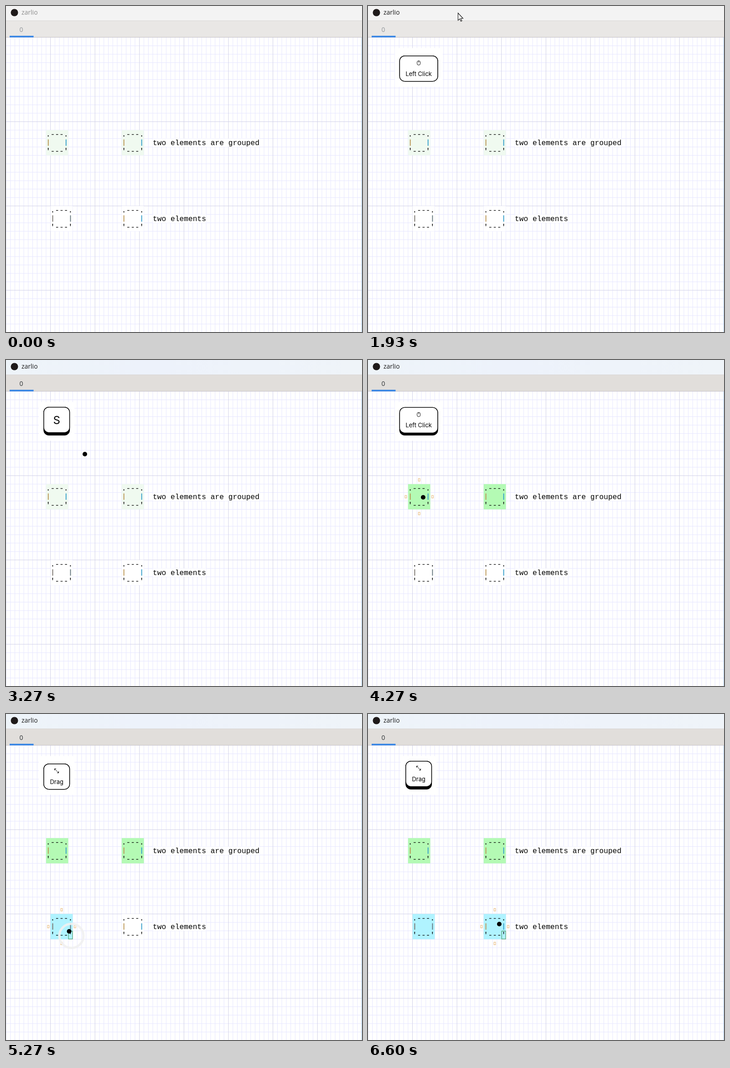
Write an HTML page that moves like this. It is 781 px wide and 717 px high and loops after 8000 ms.

```html
<!DOCTYPE html>
<html lang="en">
<head>
<meta charset="utf-8">
<title>Grouped elements</title>
<style>
  html, body { margin: 0; width: 100%; height: 100%; overflow: hidden; background: #fff; }
  svg { display: block; width: 781px; height: 717px; }
  text { white-space: pre; }
  .ui { font: 14px "Open Sans", "Noto Sans", sans-serif; }
  .mono { font: 16.26px "Liberation Mono", "Courier New", monospace; }
  .cap { font: 13px Inter, Roboto, sans-serif; text-anchor: middle; }
  .big { font-size: 24px; }
</style>
</head>
<body>
<svg id="stage" viewBox="0 0 781 717">
  <defs>
    <linearGradient id="focus">
      <stop offset="0" stop-color="#eef4f9"/>
      <stop offset=".4" stop-color="#edf2fb"/>
      <stop offset="1" stop-color="#eff4f9"/>
    </linearGradient>
  </defs>
  <g id="grid"></g>
  <rect id="titleBar" width="781" height="32"/>
  <rect y="32" width="781" height="1" fill="#d9d7d5"/>
  <rect id="tabBar" y="33" width="781" height="36"/>
  <rect y="68" width="781" height="1" fill="#d0cbc6"/>
  <rect x="8" y="65.5" width="52.5" height="3.5" fill="#3584e4"/>
  <circle cx="18.5" cy="14.5" r="8" fill="#1f1a1a"/>
  <text id="title" class="ui" x="34" y="19">zarlio</text>
  <text id="tab" class="ui" x="29.5" y="56.5">0</text>
  <g id="items"></g>
  <g id="handles" fill="none" stroke="#e6b574"></g>
  <g id="keys"></g>
  <circle id="ring" r="26.5" fill="none" stroke="#f1f1f1" stroke-width="5" stroke-opacity=".9"/>
  <circle id="dot" r="5"/>
  <path id="arrow" d="M.5.5V16.6L4.2 13.2 6.7 18.6 9 17.6 6.6 12.3H11.5Z" fill="#fff" stroke="#111" stroke-width="1.1"/>
</svg>
<script>
const LOOP = 8000, RATE = 15;          // the picture advances 15 times a second
const CW = 9.76, CH = 18.54, TOP = 69; // character cell and canvas top
const $ = id => document.getElementById(id);

function add(parent, tag, attrs, text) {
  const el = document.createElementNS("http://www.w3.org/2000/svg", tag);
  for (const name in attrs) el.setAttribute(name, attrs[name]);
  if (text) el.textContent = text;
  parent.append(el);
  return el;
}
const show = (el, on) => el.setAttribute("visibility", on ? "visible" : "hidden");
const place = (el, x, y) => el.setAttribute("transform", `translate(${x} ${y})`);
const colX = col => col * CW;
const rowY = row => TOP + row * CH;

function drawGrid() {
  for (const major of [false, true]) {
    let d = "";
    for (let i = 0; i <= 80; i++) if ((i % 10 === 0) === major) d += `M${colX(i)} ${TOP}V717`;
    for (let i = 0; i <= 34; i++) if ((i % 10 === 0) === major) d += `M0 ${rowY(i)}H781`;
    add($("grid"), "path", { d, stroke: major ? "#d0d0e8" : "#e6e6ff" });
  }
  add($("grid"), "rect", { x: 780, y: TOP, width: 1, height: 648, fill: "#a5c9ea" });
}

function label(col, row, text) {
  add($("items"), "rect", { x: colX(col), y: rowY(row), width: text.length * CW, height: CH, fill: "#fff" });
  add($("items"), "text", { class: "mono", x: colX(col), y: rowY(row) + 14.2 }, text);
}

function makeBox(col, row, left, right, resizable) {
  const x = colX(col), y = rowY(row), w = 5 * CW, h = 3 * CH;
  const fill = add($("items"), "rect", { x, y, width: w, height: h });
  add($("items"), "text", { class: "mono", x, y: y + 14 }, ".---.");
  add($("items"), "text", { class: "mono", x, y: y + 2 * CH + 14 }, "'---'");
  add($("items"), "rect", { x: x + 4, y: y + CH + 2, width: 1.8, height: 14, fill: left });
  add($("items"), "rect", { x: x + w - 5.8, y: y + CH + 2, width: 1.8, height: 14, fill: right });

  const grips = add($("handles"), "g", {});
  const cx = x + w / 2, cy = y + h / 2;
  for (const [gx, gy] of [[cx, y - CH / 2], [cx, y + h + CH / 2], [x - CW / 2, cy], [x + w + CW / 2, cy]])
    add(grips, "rect", { x: gx - 1.8, y: gy - 2.8, width: 3.6, height: 5.6 });
  if (resizable)
    add(grips, "rect", { x: x + w - CW + .5, y: y + 2 * CH + .5, width: CW - 1, height: CH - 1, stroke: "#3f8f4f" });
  return { fill, grips, hit: (px, py) => px > x && px < x + w && py > y && py < y + h };
}

function makeKey(width, text, icon) {
  const g = add($("keys"), "g", {}), x = 111.2 - width / 2;
  add(g, "rect", { x: x - 10, y: 92.5, width: width + 20, height: 85, fill: "#fff" });
  const base = add(g, "rect", { x, width, rx: 12 });
  const face = add(g, "g", {});
  add(face, "rect", { x: x + .7, y: 103.7, width: width - 1.4, height: 56, rx: 11.5, fill: "#fff", stroke: "#000", "stroke-width": 1.4 });
  if (icon) add(face, "path", { d: icon, fill: "none", stroke: "#111" });
  add(face, "text", { class: icon ? "cap" : "cap big", x: 111.2, y: icon ? 147.5 : 140.5 }, text);
  return {
    g,
    press(depth) {
      base.setAttribute("y", 103 + depth);
      base.setAttribute("height", 63 - depth);
      place(face, 0, depth);
    }
  };
}

// Linear track through [tick, ...values] rows
function track(rows, k) {
  const i = rows.findIndex(row => row[0] > k);
  if (i < 0) return rows[rows.length - 1].slice(1);
  if (i === 0) return rows[0].slice(1);
  const a = rows[i - 1], b = rows[i], f = (k - a[0]) / (b[0] - a[0]);
  return a.slice(1).map((v, j) => v + (b[j + 1] - v) * f);
}

const pointer = [
  [3, 104, 249], [7, 150, 218], [9, 176, 203], [11, 184.5, 206], [13, 184.5, 206], [14, 185.5, 206],
  [17, 185.5, 206], [23, 226, 100], [28, 197, 15], [30, 197, 15], [35, 226, 90], [40, 173, 207],
  [49, 173, 207], [57, 130, 286], [59, 121, 302], [64, 121, 302], [72, 137, 476], [78, 137, 476],
  [79, 138.5, 478], [86, 291, 458], [92, 291, 458], [95, 335, 448], [99, 288, 462]
];
const depth = [
  [27, 0], [29, 6], [31, 6], [33, 0], [45, 0], [46, 6], [47, 6], [49, 0],
  [63, 0], [64, .7], [66, 6], [67, 6], [69, 0], [70, 0], [72, 6], [93, 6], [95, 0]
];

drawGrid();
label(33, 12, "two elements are grouped");
label(33, 21, "two elements");
const TAN = "#b9924f", BLUE = "#2f9cc9";
const boxes = [
  makeBox(9, 11, TAN, BLUE, false),
  makeBox(26, 11, TAN, BLUE, false),
  makeBox(10, 20, "#77706a", "#63737c", true),
  makeBox(26, 20, TAN, BLUE, true)
];

const mouse = "M107.7 118a3.5 3.5 0 0 1 7 0v2.500a3.500 3.500 0 0 1-7 0zM111.200 114.500v4";
const arrows = "M106.500 118v-3.500h3.500M106.500 114.500l9 9M115.500 120v3.500h-3.500";
const click = makeKey(85, "Left Click", mouse);
const letter = makeKey(58, "S");
const drag = makeKey(58, "Drag", arrows);
const shownKey = k => k < 27 ? null : k < 45 ? click : k < 63 ? letter : k < 70 ? click : drag;

function draw(k) {
  const active = k >= 30;
  $("titleBar").setAttribute("fill", active ? "url(#focus)" : "#f3f3f3");
  $("tabBar").setAttribute("fill", active ? "#e1dedb" : "#e9e7e5");
  $("title").setAttribute("fill", k >= 28 ? "#1a1a1a" : "#8c8c8c");
  $("tab").setAttribute("fill", active ? "#2e3436" : "#92979b");

  const [x, y] = track(pointer, k), painting = k >= 46;
  show($("arrow"), k >= 3 && !painting);
  show($("dot"), painting);
  show($("ring"), k >= 72 && k < 89);
  place($("arrow"), x, y);
  place($("dot"), x, y);
  place($("ring"), x + 5, y + 10);

  const grouped = k >= 63 ? "#b4fab4" : "#f0faf0", picked = "#b0f3ff";
  const fills = [grouped, grouped, k >= 71 ? picked : "#fff", k >= 85 ? picked : "#fff"];
  boxes.forEach((box, i) => {
    box.fill.setAttribute("fill", fills[i]);
    show(box.grips, painting && box.hit(x, y));
  });

  const current = shownKey(k);
  for (const key of [click, letter, drag]) show(key.g, key === current);
  if (current) current.press(track(depth, k)[0]);
}

function frame() {
  const t = performance.now() % LOOP;
  draw(Math.floor((t + 4) * RATE / 1000) % (LOOP * RATE / 1000));
  requestAnimationFrame(frame);
}
frame();
</script>
</body>
</html>
```
